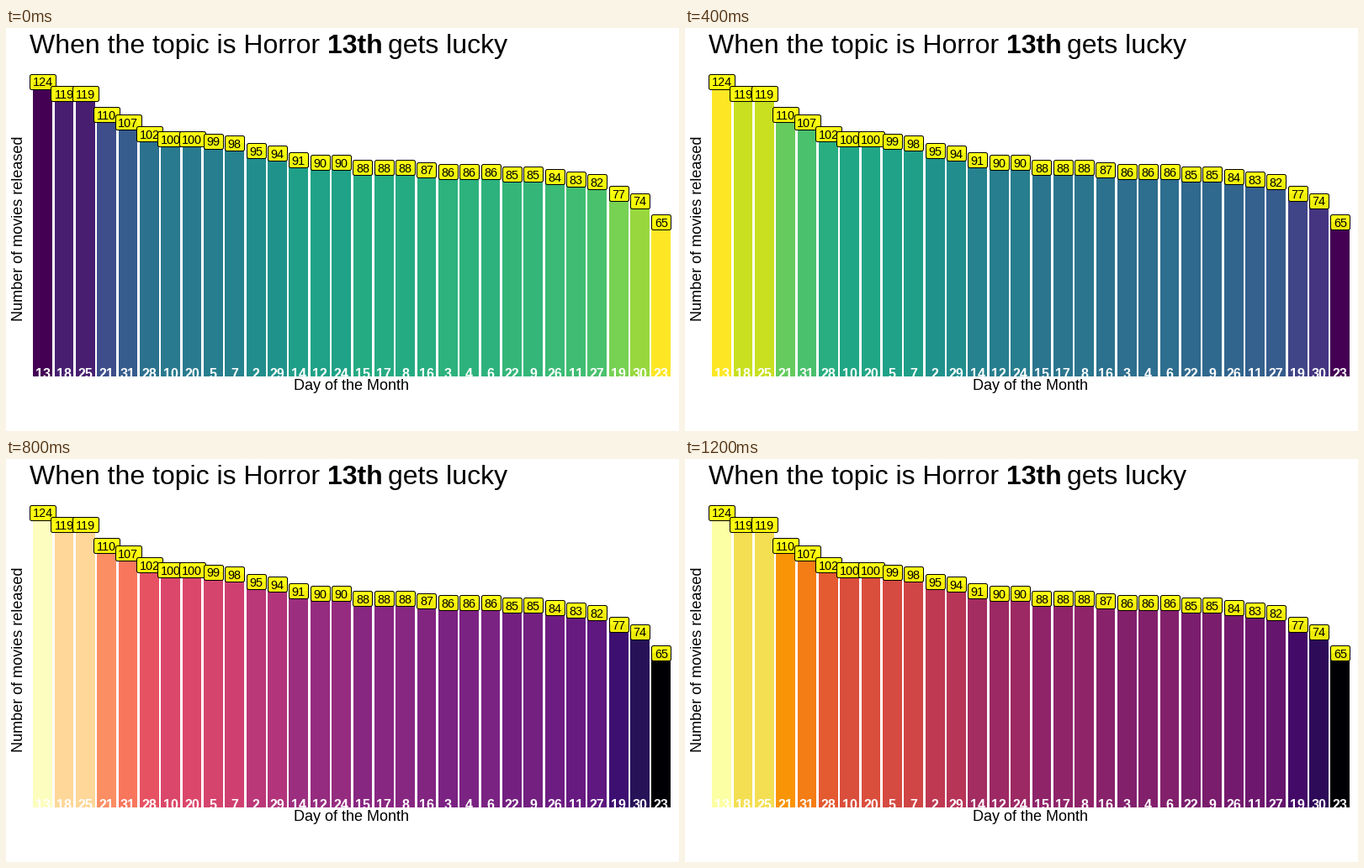
A matplotlib script for the animation above (1.6 s loop, 800 by 480 pixels).

```python
import matplotlib.pyplot as plt
from matplotlib.animation import FuncAnimation
from matplotlib.patches import FancyBboxPatch, Rectangle

W, H, DPI = 800, 480, 100
BASE, UNIT = 415, 2.834         # bar foot and pixels per movie
FIRST, STEP = 43.62, 25.353     # centre of the first bar, bar spacing
BAR = 0.9 * STEP
YELLOW = (1, 1, 0, 0.92)
CMAPS = ["viridis_r", "viridis", "magma", "inferno"]

# movies released on each day of the month, from day 2 to day 31
RELEASES = [95, 86, 86, 99, 86, 98, 88, 85, 100, 83, 90, 124, 91, 88, 87,
            88, 119, 77, 100, 110, 85, 65, 90, 119, 84, 82, 102, 94, 74, 107]
LOW, HIGH = min(RELEASES), max(RELEASES)

# tallest bar first; ties follow the day written as text
ranked = sorted(((str(day), n) for day, n in enumerate(RELEASES, start=2)),
                key=lambda item: (-item[1], item[0]))

plt.rcParams["font.family"] = "Liberation Sans"
fig = plt.figure(figsize=(W / DPI, H / DPI), dpi=DPI, facecolor="white")
ax = fig.add_axes([0, 0, 1, 1])
ax.set_xlim(0, W)
ax.set_ylim(H, 0)
ax.axis("off")


def text(x, y, s, px, **style):
    return ax.text(x, y, s, fontsize=px * 72 / DPI, va="baseline",
                   rotation_mode="anchor", **style)


def add_bar(i, day, count):
    x = FIRST + i * STEP
    top = BASE - count * UNIT
    bar = ax.add_patch(Rectangle((x - BAR / 2, top), BAR, BASE - top,
                                 lw=0, zorder=1))
    text(x, 417, day, 16, color="white", weight="bold",
         ha="center", zorder=1.5)

    # later tags cover earlier ones, together with their numbers
    width = 7 + 8 * len(str(count))
    corner = round(x - width / 2) + 0.5, int(top - 8.28) + 0.5
    ax.add_patch(FancyBboxPatch(
        corner, width, 18, boxstyle="round,pad=0,rounding_size=2.2",
        fc=YELLOW, ec="black", lw=0.72, zorder=2 + i))
    text(x, top + 5.9, str(count), 14.4, ha="center", zorder=2.5 + i)
    return bar


bars = [add_bar(i, day, n) for i, (day, n) in enumerate(ranked)]

text(28.5, 30, "When the topic is Horror", 32)
text(382, 30, "13th", 32, weight="bold")
text(454, 30, "gets lucky", 32)
text(410.5, 431, "Day of the Month", 18, ha="center")
text(20, 239, "Number of movies released", 18, rotation=90, ha="center")


def draw(frame):
    cmap = plt.get_cmap(CMAPS[frame])
    for bar, (_, count) in zip(bars, ranked):
        bar.set_facecolor(cmap((count - LOW) / (HIGH - LOW)))
    return bars


anim = FuncAnimation(fig, draw, frames=len(CMAPS), interval=400,
                     init_func=lambda: draw(0), repeat=True,
                     repeat_delay=0, blit=False)
plt.show()
```
